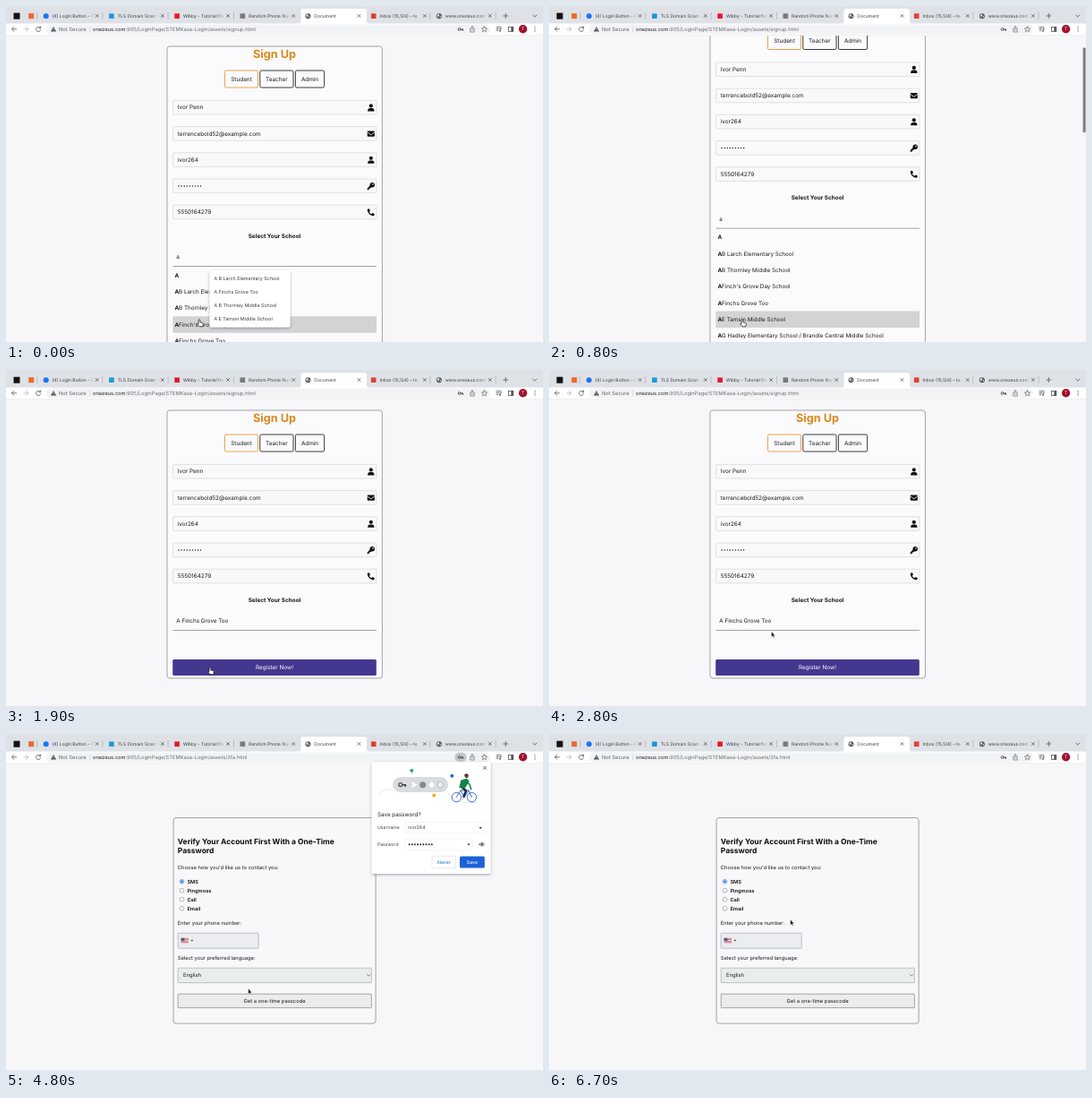
Recreate the animation shown at these times as an HTML page. Size 600 px wide and 375 px high, loop 6.8 s.

```html
<!DOCTYPE html>
<html lang="en">
<head>
<meta charset="utf-8">
<title>Sign up walkthrough</title>
<style>
html, body { margin: 0; width: 100%; height: 100%; overflow: hidden; background: #f7f6f9; }
svg { display: block; width: 600px; height: 375px; font-family: Inter, "Open Sans", sans-serif; text-rendering: geometricPrecision; }
</style>
</head>
<body>
<svg id="stage" viewBox="0 0 600 375" xmlns="http://www.w3.org/2000/svg"></svg>
<script>
const LOOP = 6800, STEP = 100;
const PICKED = 1900, FOCUSED = 3300, VERIFY = 4000;
const ROW = 18.35, LIST_TOP = 291.3;

const NAME = 'Ivor Penn', USER = 'ivor264';
const MAIL = 'terrencebold52@example.com', PHONE = '5550164279';
const SCHOOL = 'A Finchs Grove Too';
const ROWS = ['', 'B Larch Elementary School', 'B Thornley Middle School',
  "Finch's Grove Day School", 'Finchs Grove Too', 'E Tamsin Middle School',
  'G Hadley Elementary School / Brandle Central Middle School'];
const HINTS = ['A B Larch Elementary School', SCHOOL, 'A B Thornley Middle School', 'A E Tamsin Middle School'];

// drawing helpers; text is placed by its vertical middle
const rect = (x, y, w, h, fill, more = '') =>
  `<rect x="${x}" y="${y}" width="${w}" height="${h}" fill="${fill}" ${more}/>`;
const dot = (x, y, r, fill, more = '') => `<circle cx="${x}" cy="${y}" r="${r}" fill="${fill}" ${more}/>`;
const path = (d, fill, more = '') => `<path d="${d}" fill="${fill}" ${more}/>`;
const line = (d, color, w = 0.8, more = '') =>
  path(d, 'none', `stroke="${color}" stroke-width="${w}" stroke-linecap="round" stroke-linejoin="round" ${more}`);
const group = (x, y, body, scale = 1) => `<g transform="translate(${x} ${y}) scale(${scale})">${body}</g>`;
const text = (x, y, size, str, fill = '#1b1b1d', more = '') =>
  `<text x="${x}" y="${(y + size * 0.35).toFixed(2)}" font-size="${size}" fill="${fill}" ${more}>${str}</text>`;
const mid = 'text-anchor="middle"', bold = 'font-weight="700"';
const edge = (color, w, r) => `stroke="${color}" stroke-width="${w}" rx="${r}"`;
const dots = (x, y, r, gap) => Array.from({ length: 9 }, (_, i) => dot(x + i * gap, y, r, '#222')).join('');
const cross = (x, y, r, color, w) => line(`M${x - r} ${y - r}l${2 * r} ${2 * r}m0 ${-2 * r}l${-2 * r} ${2 * r}`, color, w);

const icons = {
  user: path('M-3.7 4Q-3.7 .6 -1.2 .6H1.2Q3.7 .6 3.7 4Z', '#111') + dot(0, -2, 2.1, '#111'),
  mail: rect(-4.1, -3.2, 8.2, 6.4, '#111', 'rx="1"') + line('M-4 -1.6L0 1.2L4 -1.6', '#fafafc', 0.8),
  key: dot(1.4, -1.3, 2.7, '#111') + dot(2.1, -2, 0.8, '#fafafc') +
    path('M-.9 -.8L1 1L-.2 2.1H-1.3V3.2H-2.4V4.2H-4.1V2.4Z', '#111'),
  phone: path('M-3.9 -3.5L-1.9 -4L-.8 -1.6L-2 -.5Q-1.2 1.2 .5 2L1.6 .8L4 1.9L3.5 3.9Q2.6 4.2 1.3 3.8Q-2.6 2.6 -3.8 -1.3Q-4.2 -2.6 -3.9 -3.5Z', '#111'),
  globe: dot(0, 0, 3, '#55585c') + path('M-2.2 -1L-.3 -2.3L.5 -1L-.8 0L-.6 1.8L-1.6 .8ZM.8 .2L2.3 -.4L1.6 1.6L.8 1.4Z', '#eef0f2'),
  smallKey: dot(-1.4, 0, 1.4, 'none', 'stroke="#444" stroke-width=".9"') + line('M0 0H2.7V1.2M1.6 0V1', '#444', 0.9)
};

function tab(i, label, icon) {
  const x = 73.2 * i, on = i === 4, bg = on ? '#fff' : '#dee1e6';
  const back = on ? path('M326 20Q329.5 20 329.5 16.5V6Q329.5 3 332.5 3H400Q403 3 403 6V16.5Q403 20 406.5 20Z', '#fff') : '';
  const fade = on ? '' : rect(89 + x, 5, 10, 12, 'url(#fade)') + rect(99 + x, 5, 7, 12, bg);
  const sep = i === 3 || on ? '' : rect(107.6 + x, 7, 0.5, 8, '#9aa0a6');
  return back + group(44.7 + x, 11.2, icon) +
    text(51.5 + x, 11.1, 5.03, label, '#3c4043') + fade + cross(101.7 + x, 11, 1.5, '#3c4043', 0.7) + sep;
}

function browser() {
  const square = c => rect(-2.8, -2.8, 5.6, 5.6, c);
  const tabs = [['(4) Login Button – C', dot(0, 0, 3, '#1877f2')], ['TLS Domain Scan: w', square('#1b9ad6')],
    ['Wibby - Tutorial for', square('#e3192b')], ['Random Phone Num', square('#77797c')],
    ['Document', icons.globe], ['Inbox (15,124) – te', square('#dc4034')], ['www.onezeus.com', icons.globe]];
  const url = page => `<tspan fill="#202124">onezeus.com</tspan>:905/LoginPage/STEMKasa-Login/assets/${page}`;
  const dark = '#505357';
  return rect(0, 0, 600, 20, '#dee1e6') + rect(0, 19.5, 600, 13.5, '#fff') +
    rect(8.5, 7.7, 7, 7, '#111') + rect(25.2, 8.2, 6, 6, '#ee6a2c') + rect(34.6, 7, 0.5, 8, '#9aa0a6') +
    tabs.map(([s, icon], i) => tab(i, s, icon)).join('') +
    line('M555.8 11H560.8M558.3 8.5V13.5', dark, 0.8) + line('M588.8 10.2L590.8 12.1L592.8 10.2', dark, 0.8) +
    line('M11.5 25.8H6.7M8.9 23.4L6.5 25.8L8.9 28.2', dark, 0.8) +
    line('M20 25.8H24.8M22.6 23.4L25 25.8L22.6 28.2', '#b4b6b9', 0.8) +
    line('M38.3 24.4A2.6 2.6 0 1 0 38.7 26.6M38.6 22.9V24.7H36.8', dark, 0.8) +
    rect(45, 20.4, 495.5, 11, '#f2f3f5', 'rx="5.5"') +
    path('M53 23L56.1 28.4H49.9Z', dark) + rect(52.7, 24.7, 0.6, 1.8, '#fff') + rect(52.7, 27, 0.6, 0.6, '#fff') +
    text(59, 25.7, 5.8, 'Not Secure', '#5f6368') + rect(93.6, 22.5, 0.5, 6.5, '#c4c7ca') +
    text(97, 25.7, 5.75, url('signup.html'), '#6b6f74', 'id="urlA"') +
    text(97, 25.7, 5.75, url('2fa.html'), '#6b6f74', 'id="urlB"') +
    rect(501.3, 20.8, 13.2, 10.2, '#c3c6ca', 'id="keyGlow" rx="5.1"') + group(508, 26, icons.smallKey) +
    line('M519.6 25H518.8V29H523.2V25H522.4M521 27V22.8M519.8 23.8L521 22.6L522.2 23.8', dark, 0.6) +
    line('M534.5 22.7L535.4 24.9L537.7 25L535.9 26.5L536.5 28.8L534.5 27.5L532.5 28.8L533.1 26.5L531.3 25L533.6 24.9Z', dark, 0.6) +
    line('M548 23.6H553M548 25.5H551M548 27.4H550M552.4 28V25.2H553.6', dark, 0.8) + dot(551.8, 28, 0.8, dark) +
    rect(561.6, 23.4, 5.2, 5, 'none', `stroke="${dark}" stroke-width=".8"`) + rect(564.3, 23.4, 2.5, 5, dark) +
    dot(577.6, 25.7, 4.7, '#a3122f') + text(577.6, 25.8, 4.8, 'T', '#fff', mid) +
    [23.7, 25.8, 27.9].map(y => dot(591, y, 0.6, dark)).join('') + rect(0, 32.6, 600, 0.5, '#dcdde1');
}

function signup() {
  const roles = [['Student', 244.5, 37, '#e39a3b'], ['Teacher', 283.8, 37.2, '#242426'], ['Admin', 323.4, 32.2, '#242426']];
  const fields = [[NAME, 'user'], [MAIL, 'mail'], [USER, 'user'], ['', 'key'], [PHONE, 'phone']];
  return rect(180, 45, 240.4, 299, '#fbfafc', 'id="card" ' + edge('#a3a2a7', 1, 3)) +
    text(300, 53.6, 12.7, 'Sign Up', '#d9891e', mid + ' ' + bold) +
    roles.map(([s, x, w, c]) => rect(x, 72, w, 19, '#fbfafc', edge(c, 0.9, 1.5)) +
      text(x + w / 2, 81.6, 6.4, s, '#1b1b1d', mid)).join('') +
    fields.map(([s, icon], i) => {
      const y = 113.2 + 29.2 * i;
      return rect(186.6, y - 7.8, 227.4, 15.6, '#f9f9fc', edge('#d6d6db', 0.7, 1)) +
        (s ? text(191.7, y, 6.4, s) : dots(193, y + 0.2, 0.75, 3.08)) + group(407.8, y + 0.2, icons[icon]);
    }).join('') +
    text(300, 256.7, 6.4, 'Select Your School', '#111', mid + ' ' + bold) +
    rect(186.3, 290.2, 227.7, 0.8, '#8c8c91') +
    `<g id="typing">${text(190.3, 279.8, 6.3, 'a')}${rect(193.8, 276, 0.5, 8, '#111', 'id="caret"')}
      ${rect(186.4, 0, 227.6, 18.4, '#d3d2d5', 'id="hover"')}` +
    ROWS.map((s, i) => text(188.4, 300.5 + ROW * i, 6.3, `<tspan ${bold}>A</tspan>${s}`)).join('') + '</g>' +
    `<g id="chosen">${text(190.3, 279.8, 6.3, SCHOOL)}
      ${rect(185.6, 322.2, 228.8, 19.4, 'none', 'id="ring" ' + edge('#7fb0f5', 1.5, 2))}
      ${rect(186.2, 322.9, 227.6, 18, '#44378f', 'rx="1.5"')}${text(300, 332, 6.4, 'Register Now!', '#fff', mid)}</g>`;
}

const popup = () => rect(227.5, 295, 90, 63.5, '#fff', 'rx="2" filter="url(#shade)"') +
  HINTS.map((s, i) => text(232.4, 304.6 + 15 * i, 5.35, s, '#3a3a3c')).join('');

function verify() {
  const radios = ['SMS', 'Pingmoss', 'Call', 'Email'].map((s, i) => {
    const y = 165 + 10 * i;
    return dot(196.5, y - 0.3, 2.4, '#fff', `stroke="${i ? '#85858a' : '#2f74d8'}" stroke-width=".6"`) +
      (i ? '' : dot(196.5, y - 0.3, 1.4, '#2f74d8')) + text(202.4, y, 5.7, s, '#111', 'font-weight="600"');
  }).join('');
  let flag = rect(195.6, 227.8, 8.4, 5.4, '#f4f0f2');
  for (let i = 0; i < 4; i++) flag += rect(195.6, 227.8 + i * 1.54, 8.4, 0.77, '#c4525a');
  flag += rect(195.6, 227.8, 3.8, 3, '#50547c');
  return rect(187.1, 93.5, 226, 229.6, '#f8f7fa', edge('#a3a2a7', 1, 3)) +
    text(191.8, 120.2, 8.48, 'Verify Your Account First With a One-Time', '#0c0c0d', bold) +
    text(191.8, 130.2, 8.48, 'Password', '#0c0c0d', bold) +
    text(191.8, 149.4, 5.82, "Choose how you'd like us to contact you:") + radios +
    text(191.8, 211, 5.8, 'Enter your phone number:') +
    rect(192.2, 222.2, 90, 17, '#ecedf0', edge('#a5adbd', 0.7, 0.6)) + flag + path('M206.2 229.8H209.4L207.8 231.6Z', '#444') +
    text(191.8, 250.2, 5.8, 'Select your preferred language:') +
    rect(192.2, 261.2, 216.2, 16.4, '#ebecee', edge('#a5adb8', 0.7, 0.6)) + text(198, 269.4, 5.9, 'English') +
    line('M403.4 268.6L405 270.2L406.6 268.6', '#555', 0.7) +
    rect(192.2, 290.2, 216.2, 15.4, '#ececee', edge('#85858a', 0.7, 0.6)) +
    text(300, 298, 5.8, 'Get a one-time passcode', '#1b1b1d', mid);
}

function bubble() {
  const wheel = x => dot(x, 70.6, 5.2, 'none', 'stroke="#2a62b8" stroke-width=".9"');
  const art = line('M418 66Q424 59 432 63M494 66Q499 75 512 76.5H526', '#d5d8dc', 0.6) +
    rect(432, 48, 62, 17, '#d9dbdf', 'rx="8.5"') + group(442.8, 56.6, icons.smallKey, 1.4) +
    path('M453 53L459.6 56.7L453 60.4L454.6 56.7Z', '#fff') + dot(465.6, 56.7, 3.5, '#85898e') +
    path('M475.5 53L479 56.7L475.5 60.4L472 56.7Z', '#fff') + dot(485.4, 56.7, 3.3, '#eceef0', 'stroke="#a5a8ac" stroke-width=".7"') +
    path('M450.5 40.3L455.2 38.8L454.2 43.8Z', '#1e9e53') + dot(498.3, 46.7, 2, '#2c6fd6') +
    dot(478.2, 68.6, 2, '#f0a92d') + wheel(503.3) + wheel(520.4) +
    line('M503.3 70.6L508 63H517L520.4 70.6M508 63L512 70.6L517 63', '#2a62b8', 0.9) +
    line('M508.5 58.5L514 63.5L511.5 70', '#1f2a44', 2.4) + path('M506.2 60L508.3 51.5L514.8 49.6L517.6 52.6L513 60.6Z', '#148348') +
    line('M514.8 52.5L518.2 57L519.6 61.4', '#148348', 1.6) + dot(514.6, 46.8, 2.2, '#6b3d2e') + path('M511.9 46.5Q513 43 517 45.3Z', '#1f2a44');
  const arrow = (x, y) => path(`M${x - 1.7} ${y - 0.8}h3.4l-1.7 1.9Z`, '#333');
  const box = (y, w) => rect(446, y - 6, w, 12, '#fff', edge('#eceef0', 0.6, 1));
  return rect(408.6, 31.6, 133, 124.4, '#fff', 'rx="2" filter="url(#shade)"') + art + cross(535.1, 37.8, 1.6, '#444', 0.8) +
    text(415, 90.2, 6.3, 'Save password?', '#222') +
    text(415, 104.6, 5.1, 'Username', '#444') + box(104.6, 89) + text(449.3, 104.6, 5.3, USER, '#444') + arrow(530.2, 104.8) +
    text(415, 123.2, 5.1, 'Password', '#444') + box(123.2, 75.5) + dots(450.6, 123.2, 0.95, 3.15) + arrow(517, 123.4) +
    line('M529 123.2Q531.8 119.6 534.6 123.2Q531.8 126.8 529 123.2Z', '#444', 0.8) + dot(531.8, 123.2, 1.1, '#444') +
    rect(476, 136.4, 26.6, 13.2, '#fff', edge('#dadce0', 0.6, 1.5)) + text(489.3, 143, 5.2, 'Never', '#1b66d2', mid) +
    rect(507, 136.4, 27.8, 13.2, '#1b62d6', 'rx="1.5"') + text(520.9, 143, 5.2, 'Save', '#fff', mid + ' font-weight="500"');
}

document.getElementById('stage').innerHTML = `<defs>
  <linearGradient id="fade"><stop stop-color="#dee1e6" stop-opacity="0"/><stop offset="1" stop-color="#dee1e6"/></linearGradient>
  <filter id="shade" x="-10%" y="-10%" width="120%" height="125%"><feDropShadow dx="0" dy="1" stdDeviation="1.5" flood-opacity=".35"/></filter>
  </defs>` + rect(0, 0, 600, 375, '#f7f6f9') +
  `<g id="signup">${signup()}</g><g id="verify">${verify()}</g><g id="popup">${popup()}</g>` +
  rect(596.6, 0, 3, 95, '#7c7b80', 'id="bar" rx="1.5"') + browser() + `<g id="bubble">${bubble()}</g>` +
  '<g id="mouse" stroke-linejoin="round">' +
  path('M-.9 .8Q-.9 -.2 0 -.2T.9 .8V3L3.5 3.6Q4.5 3.9 4.3 5L3.7 7.8H.2L-2.2 5.1Q-2.3 4 -1.4 4.2L-.9 4.7Z', '#fff', 'id="hand" stroke="#111" stroke-width=".7"') +
  path('M0 0V6.4L1.5 5L2.5 7.3L3.5 6.9L2.5 4.7H4.4Z', '#111', 'id="arrow" stroke="#fff" stroke-width=".5"') + '</g>';

const el = {};
document.querySelectorAll('#stage [id]').forEach(n => el[n.id] = n);
const show = (id, on) => el[id].setAttribute('opacity', +on);

// [time, x, y] of the pointer tip
const trail = [[0, 216, 350], [800, 216, 350], [1500, 219, 331], [1600, 228, 332], [1900, 228, 332], [2500, 247, 284],
  [2700, 247, 284], [3300, 255.5, 331], [4400, 255.5, 331], [4600, 268, 293], [4700, 268, 293], [4800, 270.6, 284],
  [4900, 257, 205], [5000, 300, 162], [5100, 374, 263], [5200, 374, 263], [5600, 500, 92], [5700, 500, 92],
  [5900, 534, 38], [6200, 534, 38], [6400, 522, 21], [6700, 269.6, 207]];
const bubbleKeys = [[4100, 0], [4300, 1], [6100, 1], [6300, 0]];
const barKeys = [[100, 0], [200, 1], [1000, 1], [1300, 0]];

function at(keys, t, k = 1) {
  let i = keys.findIndex(p => p[0] > t);
  if (i < 0) i = keys.length;
  if (i === 0 || i === keys.length) return keys[i ? i - 1 : 0][k];
  const a = keys[i - 1], b = keys[i];
  return a[k] + (b[k] - a[k]) * (t - a[0]) / (b[0] - a[0]);
}

function draw(t) {
  const picked = t >= PICKED, second = t >= VERIFY;
  const u = Math.min(1, Math.max(0, (t - 100) / 700));
  const scroll = picked ? 0 : 42.5 * (1 - (1 - u) ** 2.23);
  const x = at(trail, t), y = at(trail, t, 2);
  const row = t < 600 ? 3 : Math.floor((y + scroll - LIST_TOP) / ROW);

  show('signup', !second);
  show('verify', second);
  show('urlA', !second);
  show('urlB', second);
  el.signup.setAttribute('transform', `translate(0 ${-scroll})`);
  el.card.setAttribute('height', picked ? 299 : 400);
  show('typing', !picked);
  show('chosen', picked);
  show('popup', t < 200);
  show('caret', (t >= 200 && t < 600) || (t >= 1100 && t < 1600));
  show('ring', t >= FOCUSED);
  el.hover.setAttribute('y', LIST_TOP + ROW * row);

  show('bar', at(barKeys, t));
  el.bar.setAttribute('y', 34 + scroll * 0.29);
  const shown = at(bubbleKeys, t);
  show('bubble', shown);
  show('keyGlow', shown > 0);

  const hand = !second && (!picked || y > 322);
  show('hand', hand);
  show('arrow', !hand);
  el.mouse.setAttribute('transform', `translate(${x} ${y})`);
}

const start = performance.now();
function tick() {
  const t = (performance.now() - start) % LOOP;
  draw(Math.floor(t / STEP) * STEP);
  requestAnimationFrame(tick);
}
tick();
</script>
</body>
</html>
```
